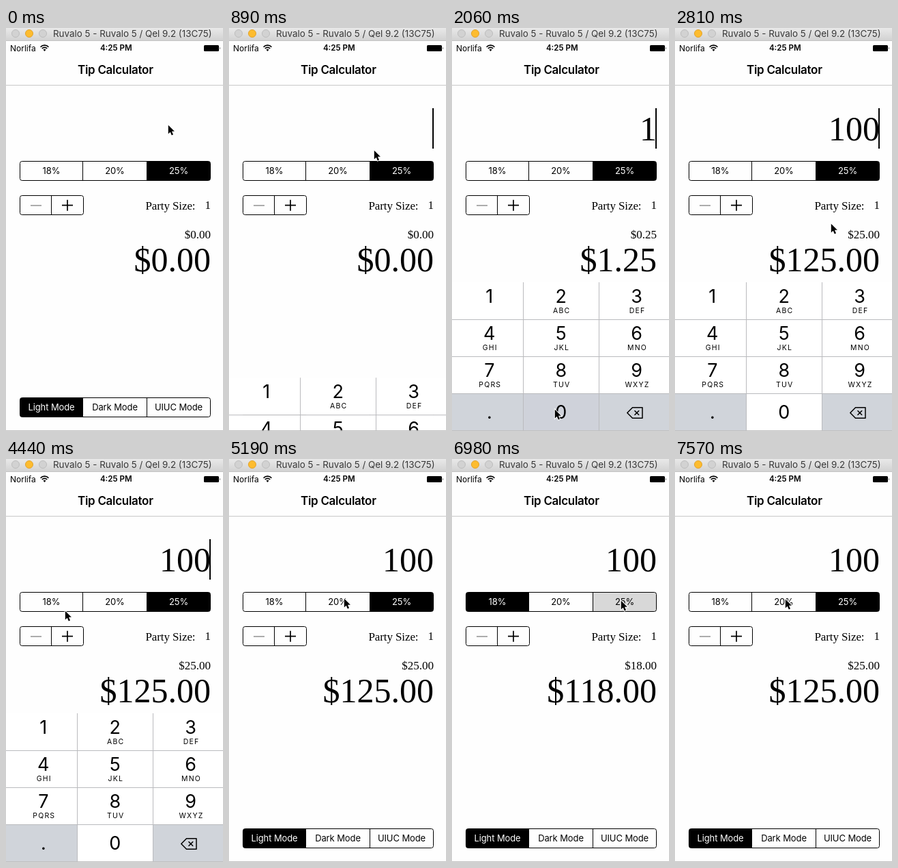
Write an HTML page that moves like this. It is 318 by 588 pixels and loops after 8 s.

```html
<!DOCTYPE html>
<html lang="en">
<head>
<meta charset="utf-8">
<title>Tip Calculator</title>
<style>
  html, body { margin: 0; width: 100%; height: 100%; overflow: hidden; background: #fff; }
  svg { display: block; width: 100vw; height: 100vh; }
  text { font-family: Inter, Roboto, sans-serif; fill: #000; }
  .serif { font-family: "Liberation Serif", "Noto Serif", serif; font-size: 17px; text-anchor: end; }
  .big { font-size: 50px; }
  .mid { text-anchor: middle; }
  .seg { font-size: 13px; letter-spacing: -.1px; text-anchor: middle; }
  .digit { font-size: 27px; text-anchor: middle; }
  .abc { font-size: 10.5px; letter-spacing: 1.2px; text-anchor: middle; }
</style>
</head>
<body>
<svg viewBox="0 0 318 588" preserveAspectRatio="none">
  <defs>
    <linearGradient id="bar" x2="0" y2="1">
      <stop stop-color="#e9e9e9"/><stop offset="1" stop-color="#d2d2d2"/>
    </linearGradient>
  </defs>
  <rect width="318" height="588" fill="#fefefe"/>
  <rect width="318" height="18" fill="url(#bar)"/>
  <rect y="18" width="318" height="1" fill="#c4c4c4"/>
  <circle cx="14" cy="8" r="5.5" fill="#d2d2d2" stroke="#bdbdbd"/>
  <circle cx="34" cy="8" r="5.5" fill="#fdbc2f" stroke="#e2a32c"/>
  <circle cx="54" cy="8" r="5.5" fill="#d2d2d2" stroke="#bdbdbd"/>
  <text x="69" y="13" font-size="13.4" style="fill:#383838">Ruvalo 5 - Ruvalo 5 / Qel 9.2 (13C75)</text>

  <text x="6" y="33.5" font-size="12">Norlifa</text>
  <path d="M50.6 27.8a8 8 0 0 1 11.8 0M52.8 30a5 5 0 0 1 7.4 0" fill="none" stroke="#000" stroke-width="1.7"/>
  <path d="M54.5 31.6L56.5 34L58.5 31.6Q56.5 30 54.5 31.6Z"/>
  <text class="mid" x="161.3" y="33.3" font-size="11.6" font-weight="600">4:25 PM</text>
  <rect x="290" y="25" width="22" height="9" rx="1.5"/>
  <path d="M313 27.8q1.4 1.7 0 3.4z"/>
  <text class="mid" x="160.3" y="67" font-size="17" font-weight="600" letter-spacing="-.3">Tip Calculator</text>
  <rect y="83" width="318" height="1" fill="#c8c8c8"/>

  <text id="bill" class="serif big" x="300" y="163.5"></text>
  <rect id="caret" x="298" y="117" width="2" height="59"/>
  <g id="tips"></g>
  <g fill="none" stroke="#000">
    <rect x="20.5" y="244.5" width="93" height="28" rx="3"/>
    <path d="M66.5 244.5v28"/>
    <path d="M36 259h16" stroke="#777" stroke-width="1.2"/>
    <path d="M82 258.7h16M90 250.7v16" stroke-width="1.7"/>
  </g>
  <text class="serif" x="277.5" y="265" letter-spacing="-.1">Party Size:</text>
  <text class="serif" x="300" y="264">1</text>
  <text id="tip" class="serif" x="300" y="307"></text>
  <text id="total" class="serif big" x="300" y="354.5"></text>
  <g id="modes"></g>
  <g id="pad"></g>
  <rect y="587" width="318" height="1" fill="#c0c0c0"/>
  <path id="mouse" d="M.8 .8V13.4L3.7 10.8L5.8 15.5L8 14.5L6 9.8H9.9Z"
        stroke="#fff" stroke-width="2" paint-order="stroke"/>
</svg>
<script>
const LOOP = 8000, FRAME = 148.5, LEAD = 16;
const $ = id => document.getElementById(id);

function add(parent, tag, attrs, text) {
  const el = document.createElementNS("http://www.w3.org/2000/svg", tag);
  for (const k in attrs) el.setAttribute(k, attrs[k]);
  if (text) el.textContent = text;
  parent.append(el);
  return el;
}

// Three-cell segmented control; returns a setter for one cell's darkness.
function segments(parent, y, labels) {
  const edges = [20.5, 112.5, 206.5, 299.5];
  const frame = { x: 20.5, y, width: 279, height: 28, rx: 3 };
  const id = parent.id + "Clip";
  add(add(parent, "clipPath", { id }), "rect", frame);
  const fills = add(parent, "g", { "clip-path": `url(#${id})` });
  const cells = labels.map((label, i) => {
    const x = edges[i], width = edges[i + 1] - x;
    return {
      box: add(fills, "rect", { x, y, width, height: 28 }),
      label: add(parent, "text", { class: "seg", x: x + width / 2, y: y + 18.5 }, label)
    };
  });
  add(parent, "rect", { ...frame, fill: "none", stroke: "#000" });
  add(parent, "path", { d: `M112.5 ${y}v28M206.5 ${y}v28`, stroke: "#000" });
  return (i, dark) => {
    cells[i].box.style.fillOpacity = dark;
    cells[i].label.style.fill = dark > .5 ? "#fff" : "#000";
  };
}

function buildPad() {
  const pad = $("pad"), keys = {};
  const left = [0, 105, 216, 318], mid = [54.8, 159.8, 270.5];
  const letters = " ABC DEF GHI JKL MNO PQRS TUV WXYZ".split(" ");
  [..."123456789.0<"].forEach((name, i) => {
    const col = i % 3, y = 371 + 54 * Math.floor(i / 3);
    const numbered = i < 9;
    keys[name] = add(pad, "rect", {
      x: left[col], y, width: left[col + 1] - left[col], height: 54,
      fill: numbered || name === "0" ? "#fff" : "#d0d4da"
    });
    if (name !== "<")
      add(pad, "text", { class: "digit", x: mid[col], y: y + (numbered ? 29.5 : 36.5) }, name);
    if (numbered)
      add(pad, "text", { class: "abc", x: mid[col] + 1, y: y + 45 }, letters[i]);
  });
  add(pad, "path", { d: "M0 425.5H318M0 479.5H318M0 533.5H318M104.5 371V587M215.5 371V587", stroke: "#babbbe" });
  add(pad, "path", {
    d: "M256.8 561.5L264.5 553.8H279V569.2H264.5ZM267.5 558.2l6.6 6.6m0-6.6l-6.6 6.6",
    fill: "none", stroke: "#000", "stroke-width": 1.5, "stroke-linejoin": "round"
  });
  return keys;
}

const setTip = segments($("tips"), 194.5, ["18%", "20%", "25%"]);
const setMode = segments($("modes"), 539.5, ["Light Mode", "Dark Mode", "UIUC Mode"]);
[1, 0, 0].forEach((dark, i) => setMode(i, dark));
const keys = buildPad();

// Pointer moves: start, end, x, y.
const moves = [
  [700, 1450, 56, 407], [1470, 1770, 150, 556], [2360, 2790, 228, 285], [2810, 3250, 240, 114],
  [3250, 4000, 107, 261], [4000, 4420, 86, 221], [4700, 5160, 168, 203], [5600, 6080, 81, 209],
  [6380, 6960, 247, 206], [7120, 7540, 161, 204]
];
const typed = [[1460, "1"], [1910, "0"], [2200, "0"]];
const taps = [[5470, 1], [6070, 0], [6960, 2]];
const rates = [.18, .20, .25];
const PRESS = 140;

const clamp = v => Math.max(0, Math.min(1, v));
const easeOut = v => 1 - (1 - clamp(v)) ** 3;
const smooth = v => clamp(v) ** 2 * (3 - 2 * clamp(v));
const money = v => "$" + v.toFixed(2);

function pointer(t) {
  let x = 237, y = 141;
  for (const [from, to, tx, ty] of moves) {
    const k = smooth((t - from) / (to - from));
    x += (tx - x) * k;
    y += (ty - y) * k;
  }
  return `translate(${Math.round(x)} ${Math.round(y)})`;
}

// Darkness of each rate cell: a light press, then a cross-fade.
function rateState(t) {
  const dark = [0, 0, 1];
  let chosen = 2;
  for (const [at, cell] of taps) {
    const age = t - at, fading = age < 2 * PRESS;
    if (age < 0) break;
    if (age < PRESS) {
      dark[cell] = .15;
      break;
    }
    dark.fill(0);
    if (fading) dark[chosen] = .065;
    dark[cell] = fading ? .96 : 1;
    chosen = cell;
  }
  return { dark, chosen };
}

function render(now) {
  const t = Math.floor((now + LEAD) / FRAME) * FRAME - LEAD;

  const { dark, chosen } = rateState(t);
  dark.forEach((d, i) => setTip(i, d));

  const bill = typed.filter(([at]) => t >= at + PRESS).map(k => k[1]).join("");
  const tip = bill * rates[chosen];
  $("bill").textContent = bill;
  $("tip").textContent = money(tip);
  $("total").textContent = money(+bill + tip);

  const blinkOff = t > 2500 && (t - 2420) % 1000 >= 520;
  const caretOn = t > 870 && t < 4880 && !blinkOff;
  $("caret").setAttribute("visibility", caretOn ? "visible" : "hidden");

  const up = easeOut((t - 820) / 400) - easeOut((t - 4780) / 380);
  $("pad").setAttribute("transform", `translate(0 ${(217 * (1 - up)).toFixed(1)})`);
  for (const key of "10") {
    const down = typed.some(([at, k]) => k === key && t >= at && t < at + PRESS);
    keys[key].setAttribute("fill", down ? "#cfd2da" : "#fff");
  }

  $("mouse").setAttribute("transform", pointer(t));
}

const start = performance.now();
function loop() {
  render((performance.now() - start) % LOOP);
  requestAnimationFrame(loop);
}
loop();
</script>
</body>
</html>
```
